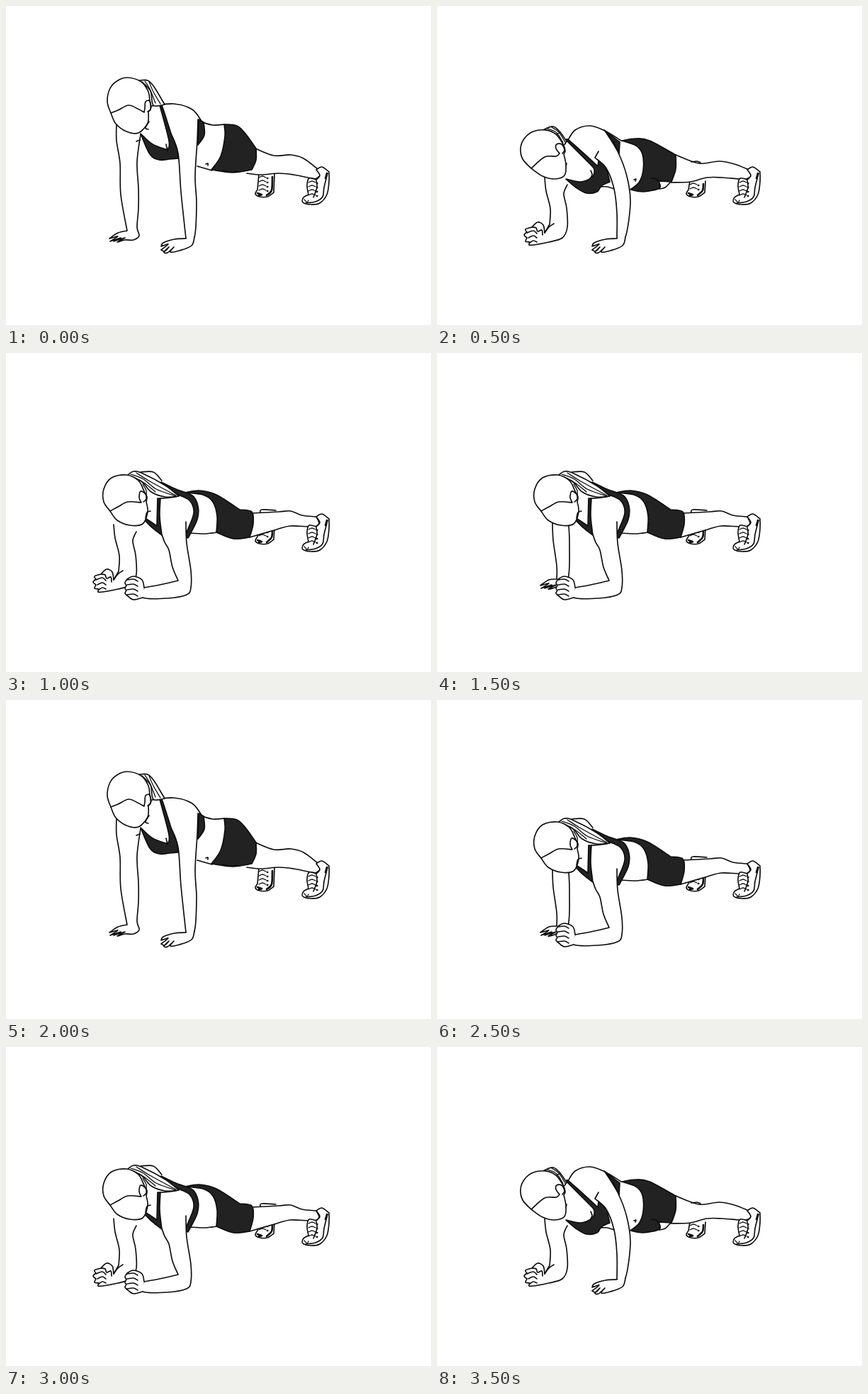
An HTML page that plays this animation: 600 px wide and 450 px high, repeating every 4000 ms.

```html
<!DOCTYPE html>
<html lang="en">
<head>
<meta charset="utf-8">
<title>Plank up-down</title>
<style>
html, body { margin: 0; width: 100%; height: 100%; overflow: hidden; background: #fff; }
svg { display: block; width: 600px; height: 450px; }
path { fill: none; stroke: #0c0c0c; stroke-width: 1.65; stroke-linecap: round; stroke-linejoin: round; }
.white { fill: #fff; }
.dark { fill: #222; }
.bold { stroke-width: 2.6; }
.thin { stroke-width: 1.3; }
</style>
</head>
<body>
<svg id="stage" viewBox="0 0 600 450"></svg>
<script>
const NS = 'http://www.w3.org/2000/svg';
const stage = document.getElementById('stage');
let group;

// Smooth curve through the points; a slash makes the point before it a corner.
function smooth(text) {
  let d = '', last = null;
  for (const run of text.split('/')) {
    const pts = run.trim().split(/\s+/).map(p => p.split(',').map(Number));
    if (last) pts.unshift(last); else d = 'M' + pts[0];
    for (let i = 1; i < pts.length; i++) {
      const a = pts[i - 1], b = pts[i];
      const before = pts[i - 2] || a, after = pts[i + 1] || b;
      const c1 = a.map((v, k) => v + (b[k] - before[k]) / 6);
      const c2 = b.map((v, k) => v - (after[k] - a[k]) / 6);
      d += 'C' + [c1, c2, b].join(' ');
    }
    last = pts[pts.length - 1];
  }
  return d;
}

function draw(style, text) {
  const p = document.createElementNS(NS, 'path');
  p.setAttribute('class', style);
  p.setAttribute('d', smooth(text));
  group.appendChild(p);
}
const white = text => draw('white', text);
const dark = text => draw('dark', text);
const line = text => draw('', text);
const thin = text => draw('thin', text);
const bold = text => draw('bold', text);

function laces(x, y, count) {
  for (let i = 0; i < count; i++, y += 6) {
    thin(`${x},${y} ${x + 5},${y - 2} ${x + 10},${y}`);
    bold(`${x + 12},${y + 1} ${x + 12.3},${y + 1}`);
  }
}

function frontShoe() {
  white('438,231 446,227 456,234 / 456,248 453,266 443,278 430,280 419,277 420,270 427,266 / 425,253 428,243 438,245 / 443,239 438,231');
  line('454,236 449,256 447,269 437,276 423,278');
  bold('453,236 451,243');
  thin('421,273 425,277 427,274');
  line('438,246 439,256 434,270');
  laces(427, 249, 4);
}

function farShoe(top, rows) {
  white(`357,${top} 355,259 / 352,265 358,269 369,269 378,263 / 379,${top}`);
  laces(357, top + 5, rows);
  bold(`376,${top + 4} 375,260 368,267`);
  bold('355,264 361,266 357,267');
}

function nearHand() {
  white('254,328 238,329 222,334 219,339 / 229,336 219,344 / 224,346 230,340 / 223,347 228,348 237,340 / 232,347 245,345 262,338 266,326');
}

const farHand = ' / 158,320 146,328 / 158,325 147,332 / 162,327 152,332 / 168,327 157,333 168,330 ';

function bentArm() {
  white('152,242 154,261 160,286 159,308 / 152,320 / 150,309 142,305 134,312 / 125,315 127,319 / 123,323 127,327 / 125,332 131,333 / 130,337 137,337 158,333 177,327 184,312 183,285 179,265 184,252');
  line('152,320 158,312 165,307');
  line('134,312 140,313 142,318 148,316 149,323');
  for (let i = 0; i < 3; i++) {
    const x = 127 + 2 * i, y = 320 + 7 * i;
    line(`${x},${y} 136,${y - 3} 141,${y + 1 - i}`);
  }
}

function high() {
  white('156,167 156,190 161,222 162,266 171,317' + farHand +
    '180,330 188,324 185,312 187,285 187,257 185,220 190,181');
  farShoe(237, 4);
  white('352,201 378,211 402,210 420,215 440,230 / 443,239 437,244 / 426,242 406,238 385,236 360,238 340,236');
  line('206,141 237,138 263,146 277,164 / 292,168 308,167');
  line('270,226 291,232');
  line('282,223 285,222 285,225');
  dark('308,167 326,169 338,180 353,201 / 353,217 347,231 / 320,235 290,231 / 303,212 309,184 308,167');
  thin('306,232 316,234 326,233');
  dark('272,160 279,164 / 280,182 271,196 / 272,160');
  dark('190,180 207,195 228,203 / 230,190 217,140 / 220,140 233,180 / 241,196 243,215 / 231,216 216,217 203,209 190,180');
  line('226,195 228,204');
  line('184,191 189,189');
  white('233,180 243,208 247,262 254,328 / 266,326 269,280 267,240 270,190 271,160');
  nearHand();
  white('188,105 200,105 209,114 224,139 / 208,140 204,120 192,107');
  thin('196,106 203,117 211,137');
  thin('202,107 208,121 218,138');
  white('148,151 143,135 147,116 158,105 172,101 191,107 201,121 203,134 205,143 201,149 / 200,165 187,179 170,177 155,166 148,151');
  line('148,151 158,147 173,140 186,145 195,150 / 196,144 197,135 203,134 204,146 200,149');
  line('202,163 197,172 201,174');
}

function mixed() {
  bentArm();
  farShoe(247, 2);
  white('337,210 370,222 398,219 420,223 440,231 / 443,240 437,244 / 426,244 403,242 381,242 358,248 330,249');
  line('359,220 367,219 372,221');
  line('314,258 322,256 329,249');
  line('184,191 195,175 216,169 237,176 260,190');
  line('229,255 240,255 250,258');
  line('278,245 281,244 280,247');
  dark('261,190 280,187 300,190 337,210 / 337,230 331,248 / 313,247 / 314,257 291,262 273,259 / 285,249 291,232 290,209 281,197 261,190');
  line('303,243 309,244 313,248');
  dark('236,175 258,192 / 257,210 / 248,190 236,175');
  dark('182,244 203,248 219,241 222,231 217,224 / 184,191 / 187,190 227,226 / 230,214 239,230 244,248 / 232,254 226,262 211,264 196,256 182,244');
  line('217,232 219,238 216,244');
  line('183,222 181,229');
  white('228,205 223,214 / 239,229 250,258 254,292 254,328 / 266,326 273,277 268,240 255,205 237,176');
  nearHand();
  white('151,174 164,170 174,178 183,191 / 177,196 166,180 151,174');
  thin('156,173 169,179 178,193');
  thin('162,171 172,178 181,192');
  thin('169,181 174,178');
  white('133,229 121,216 118,200 124,186 136,177 153,175 168,181 178,195 181,204 179,209 / 182,224 180,239 166,244 149,240 133,229');
  line('133,229 152,213 168,212 173,208 / 168,201 169,195 176,195 180,203 177,208');
}

// The near forearm, body and head shared by both forearm poses.
function lowBody() {
  farShoe(247, 2);
  line('359,226 361,221 381,222');
  white('346,226 385,224 402,223 418,229 438,231 / 442,240 437,245 / 426,245 401,244 382,249 344,260');
  line('258,254 280,255 298,253');
  dark('252,197 273,194 297,200 330,221 / 347,224 349,241 344,260 / 321,262 297,253 / 298,230 292,210 278,200 252,197');
  dark('219,182 240,192 263,201 271,216 270,235 257,261 / 254,256 265,226 259,208 240,199 / 219,182');
  dark('214,205 218,205 / 217,230 220,257 / 207,247 195,235 / 198,234 213,244 / 214,205');
  line('218,205 232,204 243,202');
  white('220,256 224,267 230,278 235,302 243,321 / 217,327 195,331 / 193,345 228,346 255,341 261,331 261,307 255,268 254,238');
  white('195,331 192,320 180,315 171,319 / 168,324 170,328 / 168,332 170,335 / 168,339 172,343 / 180,348 193,345');
  for (let y = 320; y < 346; y += 7) line(`171,${y} 180,${y - 1} 186,${y + 2}`);
}

function lowHead() {
  white('171,173 180,167 193,170 225,187 244,202 / 225,203 205,196 191,181 171,173');
  line('190,168 208,168 220,180');
  thin('176,171 194,178 212,192 240,202');
  thin('184,169 203,181 240,201');
  thin('180,175 196,184 211,196');
  thin('193,185 198,194 198,201');
  white('147,223 138,210 138,192 149,176 170,172 187,180 195,195 199,203 198,210 / 200,224 193,241 175,243 157,236 147,223');
  line('147,223 158,217 172,210 191,211 / 188,204 190,195 197,199 198,206 194,210');
  line('204,223 199,225 197,233');
}

function low() {
  bentArm();
  lowBody();
  lowHead();
}

function rise() {
  white('163,240 164,264 169,300 169,319' + farHand + '185,318 187,270 186,243');
  lowBody();
  lowHead();
}

const groups = [high, mixed, low, rise].map(pose => {
  group = stage.appendChild(document.createElementNS(NS, 'g'));
  pose();
  frontShoe();
  return group;
});

const STEP = 500;
const order = [0, 1, 2, 3, 0, 3, 2, 1];
const start = performance.now();

function show(now) {
  const step = Math.floor(Math.max(0, now - start) / STEP);
  const current = order[step % order.length];
  groups.forEach((g, i) => { g.style.display = i === current ? '' : 'none'; });
  requestAnimationFrame(show);
}
show(start);
</script>
</body>
</html>
```
